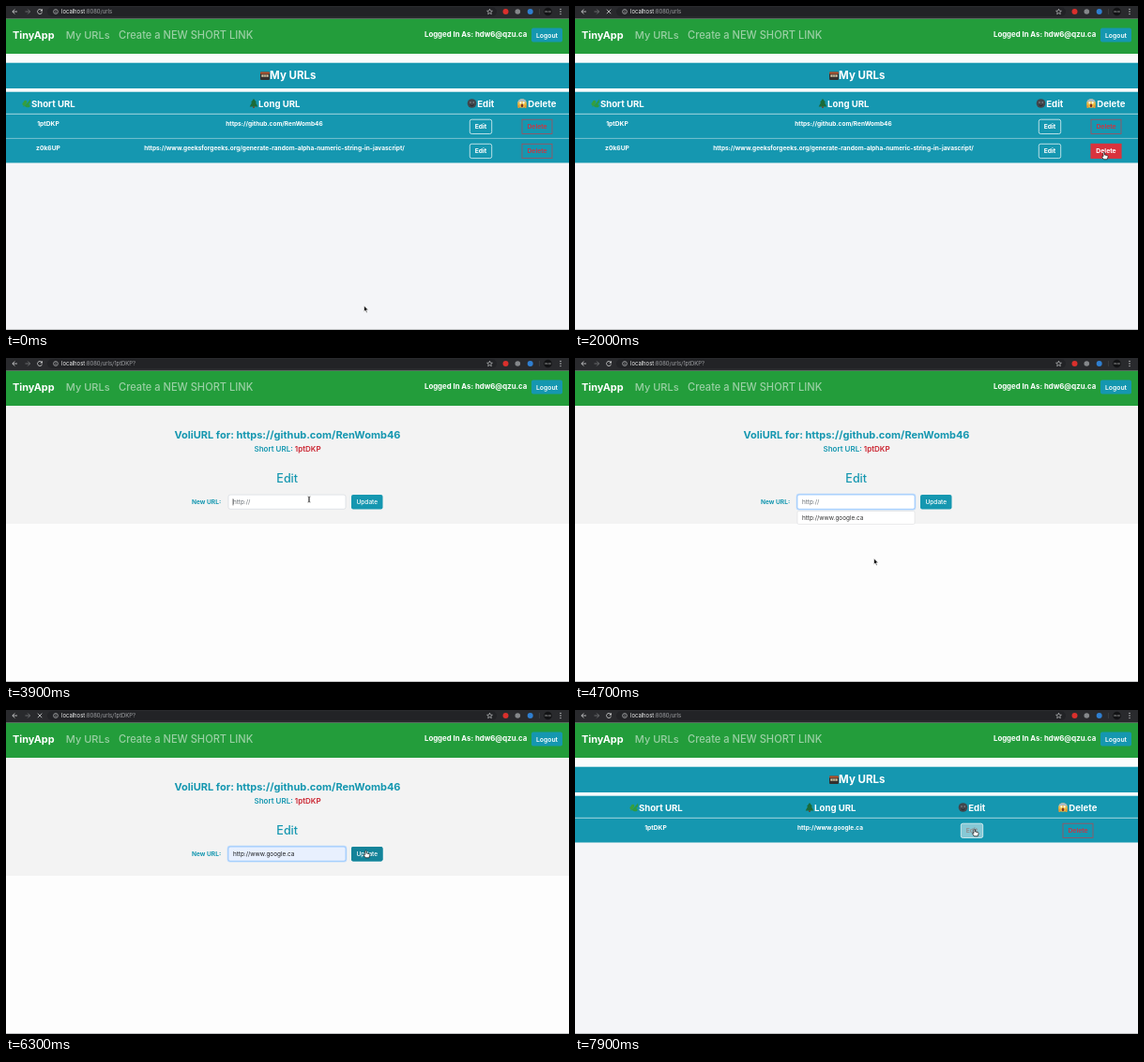
An HTML page that plays this animation: 600 by 346 pixels, repeating every 8 s.

```html
<!DOCTYPE html>
<html lang="en">
<head>
<meta charset="utf-8">
<title>Short links</title>
<style>
html, body { margin: 0; height: 100%; overflow: hidden; background: #f4f5f8; }
svg { display: block; width: 100vw; height: 100vh; font-family: Inter, "Open Sans", sans-serif; white-space: pre; }
</style>
</head>
<body>
<svg id="stage" viewBox="0 0 600 346"></svg>
<script>
const LOOP = 8000;
const TEAL = '#1597b0', GREEN = '#239d3b', RED = '#d9333d';
const CODE = '1ptDKP';
const REPO = 'https://github.com/RenWomb46';
const ARTICLE = 'https://www.geeksforgeeks.org/generate-random-alpha-numeric-string-in-javascript/';
const SITE = 'http://www.google.ca';
const stage = document.getElementById('stage');

// Moments of page changes and clicks
const DELETED = 2300, EDITING = 3400, FOCUSED = 3900, FILLED = 5200, SAVED = 6500;
const LOADING = [[1900, DELETED], [3100, EDITING], [6200, SAVED]];

// Pointer path: time, x, y, shape until the next key
const PATH = [
  [0, 381.5, 320, 'arrow'], [200, 381.5, 320, 'arrow'], [900, 564, 156, 'hand'],
  [2450, 564, 156, 'arrow'], [2900, 441, 129, 'hand'], [3450, 441, 129, 'arrow'],
  [3750, 323, 151, 'beam'], [4150, 323, 151, 'arrow'], [4500, 320, 214, 'arrow'],
  [4800, 318, 214, 'arrow'], [5150, 312, 172, 'arrow'], [5400, 318, 174, 'arrow'],
  [5580, 383, 150, 'hand'], [6750, 384, 150, 'arrow'], [7200, 398, 137, 'arrow'],
  [7700, 402, 134, 'arrow'], [7850, 426, 127, 'hand'], [8000, 426, 127, 'hand']
];

const clamp = v => Math.max(0, Math.min(1, v));
const between = (t, [a, b]) => t >= a && t < b;
const fade = (t, from, to = Infinity) => clamp((t - from) / 150) * (1 - clamp((t - to) / 150));

const rect = (x, y, w, h, fill, more = '') =>
  `<rect x="${x}" y="${y}" width="${w}" height="${h}" fill="${fill}" ${more}/>`;
const dot = (x, y, r, fill, more = '') =>
  `<circle cx="${x}" cy="${y}" r="${r}" fill="${fill}" ${more}/>`;
const shape = (d, fill, more = '') => `<path d="${d}" fill="${fill}" ${more}/>`;
const line = (d, color, width = .8) => shape(d, 'none', `stroke="${color}" stroke-width="${width}"`);
const text = (s, x, y, size, weight = 700, fill = '#fff', anchor = 'start') =>
  `<text x="${x}" y="${y}" font-size="${size}" font-weight="${weight}" fill="${fill}" text-anchor="${anchor}">${s}</text>`;
const mid = (s, x, y, size, weight, fill) => text(s, x, y, size, weight, fill, 'middle');
const at = (x, y, body) => `<g transform="translate(${x} ${y})">${body}</g>`;

const ICONS = {
  slot: rect(-5, -4, 10, 8.5, '#33302f', 'rx="1"') + rect(-5, -4, 10, 2.2, '#b8562f', 'rx=".8"') +
    rect(-3.7, -1, 7.4, 2.3, '#d8c9a4') + line('M-1.2 -1v2.3M1.2 -1v2.3', '#33302f', .6),
  herb: shape('M-4.5 4Q-1 2 4 -4.5Q5 -1 2 1Q5 2 3 4Q0 5 -2 3Z', '#2c9a43') +
    shape('M-3 3Q-6 0 -3.5 -1Q-3 -4 0 -3Q1 0 -3 3Z', '#379f3d'),
  tree: shape('M0 -5L3 -1H2L4.3 3.4H-4.3L-2 -1H-3Z', '#1c6b39') + rect(-.8, 3.2, 1.6, 1.8, '#6a4528'),
  moon: dot(0, 0, 4.8, '#42464c') + dot(-1.5, -1, .8, '#8c9196') + dot(1.7, -1, .8, '#8c9196') +
    line('M-2 1.8Q0 3.4 2 1.8', '#1d2024', .8),
  scream: dot(0, 0, 4.8, '#edbd43') + shape('M-4.6 -1A4.7 4.7 0 0 1 4.6 -1Q0 -3.6 -4.6 -1Z', '#a9b9cc') +
    dot(-1.6, -.7, 1.1, '#fff') + dot(1.6, -.7, 1.1, '#fff') +
    '<ellipse cy="2.4" rx="1.2" ry="1.8" fill="#7b3428"/>' +
    shape('M-5 1L-2.6 2V5H-4.4ZM5 1L2.6 2V5H4.4Z', '#e39a35')
};

const POINTERS = {
  arrow: shape('M0 0V6.5L1.5 5.1L2.6 7.4L3.6 6.9L2.6 4.7H4.7Z', '#111', 'stroke="#fff" stroke-width=".6"'),
  hand: shape('M-1 .6Q-.2 -.4 .5 .6V3L3.4 3.6Q4.3 4 4 5.2L3.2 7.8H-.6L-2.6 4.8Q-2.4 3.8 -1 4.6Z',
    '#fff', 'stroke="#111" stroke-width=".7"'),
  beam: line('M-1.4 -3Q0 -3 0 -2V2Q0 3 -1.4 3M1.4 -3Q0 -3 0 -2V2Q0 3 1.4 3', '#222', .7)
};

function browserBar(path, loading) {
  const pale = '#d6d7d9';
  return rect(0, 0, 600, 13.6, '#292a2d') + rect(44, 1.3, 479, 9.6, '#222326', 'rx="4.8"') +
    line('M12 6H7M9.3 3.5L6.8 6L9.3 8.5', pale) +
    line('M20.5 6H25.5M23.2 3.5L25.7 6L23.2 8.5', '#77797c') +
    (loading ? line('M33.8 3.7L38.3 8.2M38.3 3.7L33.8 8.2', pale)
      : line('M38 4.4A2.5 2.5 0 1 0 38.5 6.6', pale) + shape('M38.9 3V5.6H36.3Z', pale)) +
    dot(53, 6, 2.4, 'none', `stroke="${pale}" stroke-width=".6"`) + line('M53 5.6V7.4M53 4.4V5', pale, .6) +
    text(`localhost<tspan fill="#a0a2a5">:8080${path}</tspan>`, 59, 8.1, 5.9, 400, '#f2f2f2') +
    shape('M515.5 3.2L516.3 5.1L518.4 5.3L516.8 6.6L517.3 8.7L515.5 7.6L513.7 8.7L514.2 6.6L512.6 5.3L514.7 5.1Z',
      'none', `stroke="${pale}" stroke-width=".6"`) +
    dot(532.5, 6, 3, '#d9302c') + dot(545.3, 6, 2.8, '#85888b') + dot(558.7, 6, 3, '#2f7fd0') +
    line('M568.5 3V9', '#4b4c4f', .5) + dot(577.5, 6, 4.3, '#121315') +
    mid('link app', 577.5, 6.6, 1.9, 400, '#b8b8b8') +
    [3.4, 6, 8.6].map(y => dot(591, y, .7, pale)).join('');
}

function navbar() {
  return rect(0, 13.6, 600, 37.4, GREEN) +
    text('TinyApp', 7, 34.8, 10.9) +
    text('My URLs', 63.8, 34.8, 11, 500, '#9ad0a4') +
    text('Create a NEW SHORT LINK', 120, 34.8, 11.1, 500, '#9ad0a4') +
    text('Logged In As: hdw6@qzu.ca', 446, 33.2, 7.8) +
    rect(560, 23.6, 33, 15, TEAL, 'rx="2"') + mid('Logout', 576.5, 33.5, 6.8, 600);
}

function editButton(x, y, hover, ring) {
  const box = more => rect(x - 11.7, y, 23.4, 15.3, ...more);
  return (ring ? rect(x - 13.2, y - 1.5, 26.4, 18.3, '#8fcbd7', 'rx="3"') : '') +
    box(['none', 'rx="2" stroke="#e4f1f4" stroke-width=".8"']) + mid('Edit', x, y + 10.1, 6.7) +
    `<g opacity="${hover}">` + box(['#f8f9fa', 'rx="2"']) + mid('Edit', x, y + 10.1, 6.7, 700, '#23282c') + '</g>';
}

function deleteButton(x, y, hover) {
  return rect(x - 16, y, 32, 15.3, 'none', `stroke="${RED}" stroke-opacity=".75" stroke-width=".8"`) +
    mid('Delete', x, y + 10.1, 6.8, 600, '#cf3340') +
    `<g opacity="${hover}">` + rect(x - 16.4, y - .4, 32.8, 16.2, RED) + mid('Delete', x, y + 10.1, 6.8) + '</g>';
}

function listPage(t) {
  const first = t < DELETED, last = t >= SAVED;
  const cols = first ? [45, 286, 506, 566] : last ? [86, 272, 423, 536] : [75, 276, 445, 544];
  const rows = [[CODE, last ? SITE : REPO]];
  if (first) rows.push(['z0k6UP', ARTICLE]);
  const heads = [['Short URL', 'herb', 23], ['Long URL', 'tree', 22], ['Edit', 'moon', 9.5], ['Delete', 'scream', 16]];
  const bottom = 115.5 + 26 * rows.length;
  const editHover = last ? fade(t, 7825) : fade(t, 2850);

  return rect(0, 51, 600, 295, '#f4f5f8') + rect(0, 51, 600, 41, '#fafcfc') +
    rect(0, 60.7, 600, 27.3, TEAL) + at(276, 74.4, ICONS.slot) + mid('My URLs', 305.8, 78.4, 11.5) +
    rect(0, 91.7, 600, bottom - 91.7, TEAL) +
    heads.map(([name, icon, dx], i) =>
      at(cols[i] - dx, 104, ICONS[icon]) + mid(name, cols[i] + 5.3, 107.6, 9.6)).join('') +
    line('M0 115.3H600', '#a6d7e0', 1) +
    rows.map(([code, url], i) => {
      const y = 121.2 + 26.1 * i;
      return (i ? line('M0 141.4H600', '#91cdd9', .8) : '') +
        mid(code, cols[0], y + 7.1, 6.7) + mid(url, cols[1], y + 7.1, 6.5) +
        editButton(cols[2], y, i ? 0 : editHover, !last && t >= 3050) +
        deleteButton(cols[3], y, i ? fade(t, 850) : 0);
    }).join('');
}

function editPage(t) {
  const focus = fade(t, FOCUSED), filled = t >= FILLED;
  const caret = t >= FOCUSED && !filled && (t - FOCUSED) % 1000 < 500;
  const menu = t >= 4150 && !filled;
  const update = fade(t, 5520);
  return rect(0, 51, 600, 126, '#f3f3f3') + rect(0, 177, 600, 169, '#fdfdfd') +
    mid(`VoliURL for: ${REPO}`, 300, 86, 11, 700, TEAL) +
    mid(`Short URL: <tspan fill="#cb2430">${CODE}</tspan>`, 300, 99.6, 8, 600, TEAL) +
    mid('Edit', 299.7, 132.8, 12.5, 500, TEAL) +
    text('New URL:', 198, 156.2, 6.6, 700, TEAL) +
    rect(235.7, 144.8, 127.6, 17.8, '#bcd9fb', `rx="3" opacity="${focus}"`) +
    rect(237, 146.1, 125, 15.2, filled ? '#e8f0fe' : '#fff',
      `rx="2" stroke="${t > FOCUSED + 75 ? '#80bdff' : '#ced4da'}" stroke-width=".6"`) +
    text(filled ? SITE : 'http://', 242, 156, 6.4, 400, filled ? '#1c1e20' : '#686e73') +
    (caret ? line('M242 150.3V157.4', '#222', .6) : '') +
    (menu ? rect(237, 163.5, 125, 14, '#fff', 'rx="1.5" stroke="#d4d6d9" stroke-width=".5"') +
      text(SITE, 242, 172.9, 6.4, 400, '#333') : '') +
    rect(368, 146, 33.5, 15.5, TEAL, 'rx="2"') +
    rect(368, 146, 33.5, 15.5, '#138399', `rx="2" opacity="${update}"`) +
    mid('Update', 384.8, 156.1, 6.5, 500);
}

function pointer(t) {
  const i = PATH.findIndex(key => key[0] > t);
  const [t0, x0, y0, kind] = PATH[i - 1], [t1, x1, y1] = PATH[i];
  const u = (t - t0) / (t1 - t0), e = u * u * (3 - 2 * u);
  return at(x0 + (x1 - x0) * e, y0 + (y1 - y0) * e, POINTERS[kind]);
}

function draw(now) {
  const t = now % LOOP;
  const editing = t >= EDITING && t < SAVED;
  const path = t >= 3100 && t < SAVED ? `/urls/${CODE}?` : '/urls';
  stage.innerHTML = (editing ? editPage(t) : listPage(t)) + navbar() +
    browserBar(path, LOADING.some(span => between(t, span))) +
    rect(0, 345.3, 600, .7, '#a9abad') + pointer(t);
}

let start;
function tick(now) {
  start ??= now;
  draw(now - start);
  requestAnimationFrame(tick);
}
draw(0);
requestAnimationFrame(tick);
</script>
</body>
</html>
```
